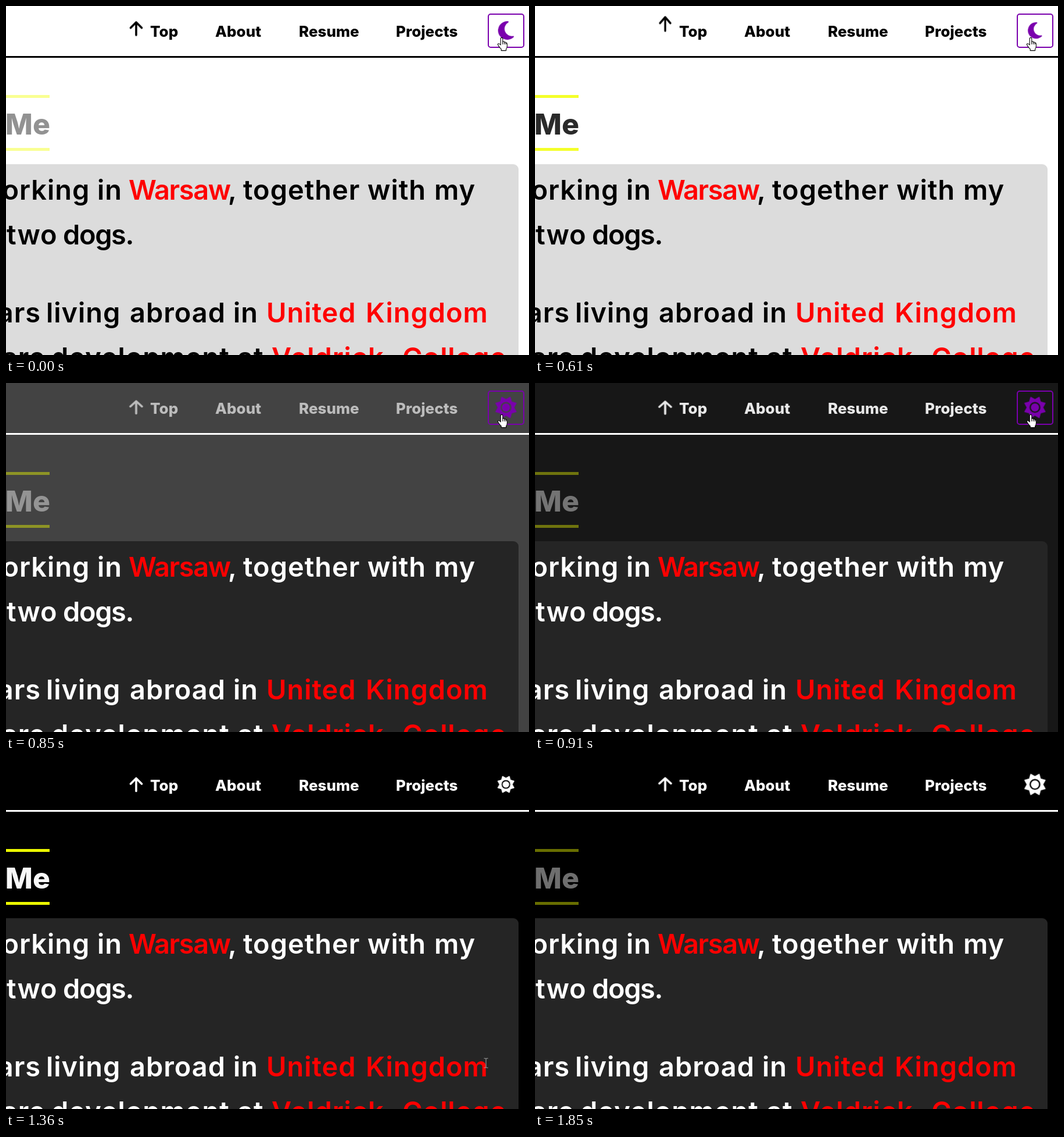
Animation, 900 px wide and 600 px high, one loop 1.87 s. Source, as an HTML page:

```html
<!DOCTYPE html>
<html lang="en">
<head>
<meta charset="utf-8">
<title>Theme switch</title>
<style>
html, body { margin: 0; width: 100%; height: 100%; overflow: hidden; background: #fff; }
svg { display: block; width: 900px; height: 600px; font-family: Inter, "Noto Sans", sans-serif; }
#nav { font-size: 26px; font-weight: 800; color: #000; }
#nav text { fill: currentColor; }
#arrow { fill: none; stroke: currentColor; stroke-width: 3.6; stroke-linecap: round; stroke-linejoin: round; transform-origin: 224px 42.5px; }
#rule { fill: #000; }
#title text { font-size: 50px; font-weight: 800; fill: #000; }
#title rect { fill: #f2ff00; }
#panel { fill: #dcdcdc; }
#copy { font-size: 47px; font-weight: 600; letter-spacing: .02em; fill: #000; }
#copy .hot { fill: #f00; }
#copy .tight { letter-spacing: -.03em; }
#frame { fill: none; stroke: #7a00ad; stroke-width: 2; }
#icon { color: #7a00ad; fill: currentColor; }
#sun path { stroke: currentColor; stroke-linejoin: round; }
.dark #rule, .dark #title text, .dark #copy { fill: #fff; }
.dark #copy .hot { fill: #f00; }
.dark #panel { fill: #252525; }
#sun, .dark #moon { display: none; }
.dark #sun { display: inline; }
#cursor path { fill: #fff; stroke: #000; stroke-width: 1.1; stroke-linejoin: round; }
#cursor #creases, #cursor #beam { fill: none; }
#cursor #beam { stroke: #aaa; stroke-width: 1; }
</style>
</head>
<body>
<svg id="stage" viewBox="0 0 900 600">
  <g id="nav">
    <path id="arrow" d="M224 31.5V53.5M214.5 41L224 31.5L233.5 41"/>
    <text x="248" y="53">Top</text>
    <text x="360" y="53">About</text>
    <text x="504" y="53">Resume</text>
    <text x="671" y="53">Projects</text>
  </g>
  <rect id="rule" y="86" width="900" height="3"/>
  <g id="title">
    <rect y="153" width="75" height="5"/>
    <text x="76" y="221" text-anchor="end">Me</text>
    <rect y="244" width="75" height="5"/>
  </g>
  <rect id="panel" x="-20" y="272" width="902" height="360" rx="9"/>
  <g id="copy"></g>
  <rect id="frame" x="830" y="14" width="61" height="57" rx="4"/>
  <g transform="translate(860.3 42)">
    <g id="icon">
      <path id="moon" d="M2-13.1A13.1 13.1 0 1 0 11 9.4Q11.8 7.7 10.2 7.8A10.3 10.3 0 0 1 3.3-11.3Q4.8-12.9 2-13.1Z"/>
      <g id="sun"><path fill-rule="evenodd"/><circle r="5.6"/></g>
    </g>
  </g>
  <g id="cursor">
    <g id="hand">
      <path d="M-1.8 13V2Q-1.8 .4 0 .4T1.8 2V7.5Q4.4 6.2 4.8 8.4Q7 7.4 7.4 9.4Q9.4 9 9.4 11V15Q9.4 18 7.6 20V22.6H-.8V20Q-3 18.5-6.5 12.8Q-7.2 10.6-5 10.8Q-3.6 11-1.8 13Z"/>
      <path id="creases" d="M1.8 7.5V12M4.8 8.4V12M7.4 9.4V12"/>
    </g>
    <path id="pointer" d="M0 0V15.5L3.4 12.4L5.8 18L8.4 17L6 11.4H10.6Z"/>
    <path id="beam" d="M-3.5-8H-1Q0-8 0-7V7Q0 8-1 8H-3.5M3.5-8H1Q0-8 0-7M3.5 8H1Q0 8 0 7"/>
  </g>
</svg>
<script>
const LOOP = 1870, SWITCH = 718, LEAVE = 1060;
const $ = id => document.getElementById(id);

// Each line: baseline, then words as [x, text, class]; "end" anchors at the right edge.
const lines = [
  [333, [200, "working in", "end"], [211, "Warsaw", "hot tight"], [382, ","],
    [408, "together"], [622, "with"], [737, "my"]],
  [410, [1, "two"], [98, "dogs.", "tight"]],
  [544, [60, "years", "end"], [69, "living"], [213, "abroad"], [391, "in"],
    [448, "United", "hot"], [619, "Kingdom", "hot"]],
  [621, [68, "software", "end"], [78, "development"], [398, "at"],
    [457, "Veldrick", "hot"], [682, "College", "hot"]]
];
for (const [y, ...words] of lines) {
  for (const [x, word, kind = ""] of words) {
    const el = document.createElementNS("http://www.w3.org/2000/svg", "text");
    el.setAttribute("x", x);
    el.setAttribute("y", y);
    if (kind === "end") el.setAttribute("text-anchor", "end");
    else el.setAttribute("class", kind);
    el.textContent = word;
    $("copy").append(el);
  }
}

// Eight-pointed star with a round hole.
const star = Array.from({ length: 16 }, (_, i) => {
  const a = (i + 1) * Math.PI / 8, r = i % 2 ? 10.9 : 15.3;
  return (r * Math.cos(a)).toFixed(2) + " " + (r * Math.sin(a)).toFixed(2);
});
$("sun").firstChild.setAttribute("d", "M" + star.join("L") + "ZM8 0A8 8 0 1 0-8 0A8 8 0 1 0 8 0Z");

const anims = [];
function animate(el, frames, easing, timing) {
  const a = el.animate(frames.map(f => ({ easing, ...f })), { fill: "both", ...timing });
  a.pause();
  anims.push(a);
}
const cycle = { duration: 1000, delay: -570, iterations: Infinity };
const fade = delay => ({ duration: 300, delay });

const hop = (offset, sx, sy, y) => ({ offset, transform: `translateY(${y}px) scale(${sx}, ${sy})` });
animate($("arrow"), [
  hop(0, 1, 1, 0), hop(.1, 1.1, .9, 0), hop(.3, .9, 1.1, -14), hop(.5, 1.05, .95, 0),
  hop(.57, 1, 1, -3.5), hop(.64, 1, 1, 0), hop(1, 1, 1, 0)
], "cubic-bezier(.28,.84,.42,1)", cycle);
animate($("icon"), [
  { transform: "scale(1)" }, { offset: .45, transform: "scale(1.25)" },
  { offset: .9, transform: "scale(1)" }, { transform: "scale(1)" }
], "ease-in-out", cycle);
animate($("title"), [{ opacity: 1 }, { opacity: .4 }, { opacity: 1 }], "cubic-bezier(.4,0,.6,1)", cycle);

animate(document.body, [{ backgroundColor: "#fff" }, { backgroundColor: "#000" }], "ease", fade(SWITCH));
animate($("nav"), [{ color: "#000" }, { color: "#fff" }], "ease", fade(SWITCH));
animate($("icon"), [{ color: "#7a00ad" }, { color: "#fff" }], "ease", fade(LEAVE));

const path = [[0, 853, 54], [960, 853, 54], [1060, 842, 82], [1120, 810, 178],
  [1360, 826, 521], [1480, 826, 560], [LOOP, 826, 560]];
animate($("cursor"), path.map(([t, x, y]) =>
  ({ offset: t / LOOP, transform: `translate(${x}px, ${y}px)` })), "linear", { duration: LOOP });

// The picture advances in steps of about 60 ms.
const gaps = [0, 60, 60, 70, ...Array(13).fill(60), 50, 50, 50, ...Array(11).fill(60), 70];
let sum = 0;
const ticks = gaps.map(g => sum += g);

const show = (id, on) => { $(id).style.visibility = on ? "visible" : "hidden"; };
function draw(t) {
  for (const a of anims) a.currentTime = t;
  $("stage").classList.toggle("dark", t >= SWITCH);
  show("frame", t < LEAVE);
  show("hand", t < LEAVE);
  show("pointer", t >= LEAVE && t < 1210);
  show("beam", t >= 1210 && t < 1540);
}

const start = performance.now();
function loop() {
  const now = (performance.now() - start) % LOOP;
  draw(ticks.filter(t => t <= now).pop() || 0);
  requestAnimationFrame(loop);
}
loop();
</script>
</body>
</html>
```
